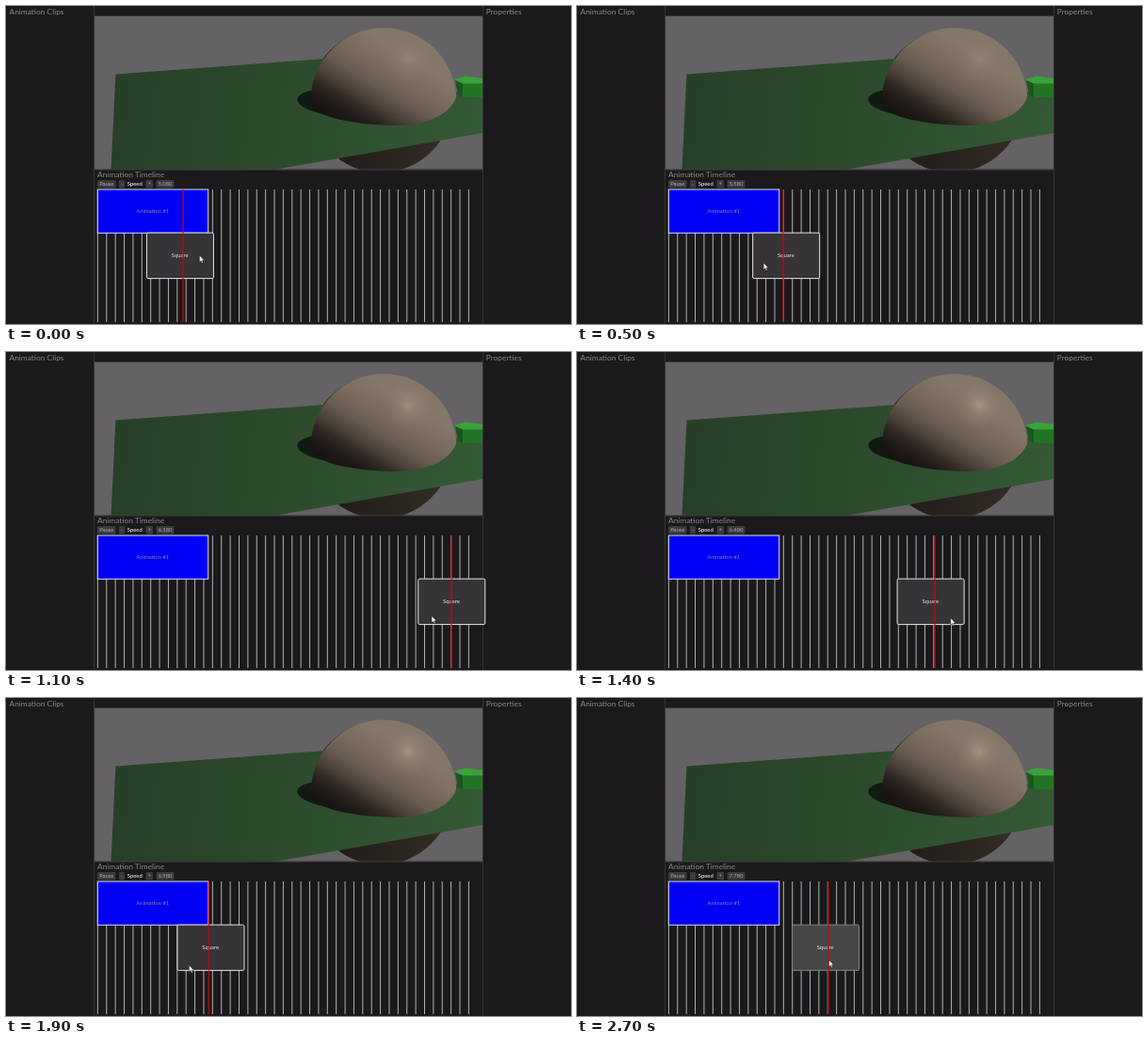
These frames come from a looping animation (600 by 338 pixels, 2.8 s). An HTML page:

```html
<!DOCTYPE html>
<html lang="en">
<head>
<meta charset="utf-8">
<title>Animation Timeline</title>
<style>
  html, body { margin: 0; width: 100%; height: 100%; overflow: hidden; background: #1b191b; }
  svg { display: block; width: 600px; height: 338px; }
  text { font: 5.9px Lato, sans-serif; fill: #acacac; }
  .title { font-size: 8.4px; fill: #888; }
  .mid { text-anchor: middle; }
  .button { fill: #3b3b3b; }
  .edge { stroke: #353435; fill: none; }
  #clip rect { fill: #363436; stroke: #e6e6e6; }
  #clip.released rect { fill: #464646; stroke: #858585; }
  #clip text { fill: #e6e6e6; }
</style>
</head>
<body>
<svg viewBox="0 0 600 338">
  <defs>
    <clipPath id="view"><rect x="94" y="11" width="412" height="162.7"/></clipPath>
    <clipPath id="above">
      <path d="M300 11H500V94H479C474 114 449 127 413 127C366 126 328 118 322 102H300Z"/>
    </clipPath>
    <linearGradient id="grass" gradientUnits="userSpaceOnUse" x1="120" y1="80" x2="500" y2="130">
      <stop offset="0" stop-color="#273f28"/>
      <stop offset=".45" stop-color="#2b4a2b"/>
      <stop offset="1" stop-color="#345a35"/>
    </linearGradient>
    <linearGradient id="skin" gradientUnits="userSpaceOnUse" x1="430" y1="55" x2="378" y2="140">
      <stop offset="0" stop-color="#85766a"/>
      <stop offset=".25" stop-color="#7a6b5e"/>
      <stop offset=".45" stop-color="#675a4f"/>
      <stop offset=".6" stop-color="#4d433a"/>
      <stop offset=".74" stop-color="#2f2823"/>
      <stop offset=".87" stop-color="#1d1916"/>
      <stop offset="1" stop-color="#161311"/>
    </linearGradient>
    <radialGradient id="shine">
      <stop offset="0" stop-color="#cdbba8" stop-opacity=".8"/>
      <stop offset=".4" stop-color="#b8a591" stop-opacity=".4"/>
      <stop offset="1" stop-color="#a08d7b" stop-opacity="0"/>
    </radialGradient>
    <linearGradient id="under">
      <stop offset="0" stop-color="#1d1916"/>
      <stop offset="1" stop-color="#342d27"/>
    </linearGradient>
  </defs>

  <rect width="600" height="338" fill="#1b191b"/>

  <g clip-path="url(#view)">
    <rect x="94" y="11" width="412" height="163" fill="#646264"/>
    <circle cx="398" cy="101" r="76" fill="url(#under)"/>
    <path d="M116.4 72.5L339 56L440 48L477 91L506 97V135L285 174H111.5Z" fill="url(#grass)"/>
    <path d="M328 89C313 91 307 97 310 102C314 109 327 113 345 117V89Z" fill="#0f1b11"/>
    <path d="M476 78L488 74.5L508 77V82.5L485 82.5Z" fill="#39a339"/>
    <path d="M477 79L485 82.5V97L480 95Z" fill="#1a571c"/>
    <path d="M485 82.5H508V97L485 96.5Z" fill="#237524"/>
    <g clip-path="url(#above)">
      <circle cx="401" cy="100.5" r="77.3" fill="url(#skin)"/>
      <circle cx="427" cy="57" r="26" fill="url(#shine)" id="glow"/>
    </g>
  </g>

  <path class="edge" d="M93.5 0V338M506.5 0V338M94 10.5H506M94 174.2H506"/>

  <text class="title" x="3.5" y="8.8">Animation Clips</text>
  <text class="title" x="509.7" y="8.8">Properties</text>
  <text class="title" x="97" y="181.8">Animation Timeline</text>

  <g class="button">
    <rect x="97" y="185" width="19.5" height="8.5" rx="1"/>
    <rect x="120" y="185" width="6" height="8.5" rx="1"/>
    <rect x="148.5" y="185" width="7.5" height="8.5" rx="1"/>
    <rect x="159.5" y="185" width="19" height="8.5" rx="1"/>
  </g>
  <g class="mid">
    <text x="106.8" y="191.3">Pause</text>
    <text x="123" y="191.3">-</text>
    <text x="136.8" y="191.3" style="fill:#fff">Speed</text>
    <text x="152.3" y="191.3">+</text>
    <text x="169" y="191.3" id="clock"></text>
  </g>

  <path id="grid" stroke="#b4b4b4"/>
  <rect x="97.3" y="195" width="117.4" height="46.3" fill="#0000f4" stroke="#dedeee"/>
  <text class="mid" x="155.8" y="220.2" style="fill:#8080b4">Animation #1</text>

  <g id="clip">
    <rect x=".5" y="241.1" width="71" height="48.5" rx="1.5"/>
    <text class="mid" x="35.7" y="267.2">Square</text>
  </g>
  <path id="head" d="M0 195V336" stroke="#d80010" stroke-width="1.5" stroke-opacity=".78"/>
  <path id="mouse" d="M0 0V7.2L1.7 5.7L2.8 8.2L4 7.7L2.9 5.2H5.1Z" fill="#fff" stroke="#161616" stroke-width=".5"/>
</svg>

<script>
const STEP = 100, LOOP = 2800, RELEASE = 25;
const REST = 264, NOTCH = 4.65, GRID = 9.381;
const $ = id => document.getElementById(id);
const clamp = (v, lo, hi) => Math.min(hi, Math.max(lo, v));

// turning points of the drag: step, playhead x
const turns = [[0, 188], [3, 246], [8.5, 154], [11, 473], [13, 352], [15, 408], [20, 195], [23, 264.2], [28, 267]];

function swing(step) {
  const i = turns.findIndex(turn => turn[0] > step);
  const [t0, x0] = turns[i - 1], [t1, x1] = turns[i];
  const ease = (1 - Math.cos(Math.PI * (step - t0) / (t1 - t0))) / 2;
  return { x: x0 + (x1 - x0) * ease, span: x1 - x0 };
}

// the clip trails the playhead, snapped to notches
function clipX({ x, span }) {
  const snap = span > 0 ? Math.floor : Math.ceil;
  return REST - 35.5 + NOTCH * snap((x - REST) / NOTCH);
}

const move = (id, x, y = 0) => $(id).setAttribute('transform', `translate(${x} ${y})`);

function draw(step) {
  const head = swing(step);
  const lead = clamp(head.span * 0.3, -21, 21);
  move('head', head.x);
  move('clip', clipX(head) - 0.5);
  move('mouse', head.x + lead, 265 + 19 * Math.sin(Math.PI * step / 36));
  $('clip').classList.toggle('released', step >= RELEASE);
  $('clock').textContent = (5.08 + step * STEP / 1000).toFixed(3);
  $('glow').setAttribute('opacity', 0.25 + 0.3 * clamp((step - 9) / 3, 0, 1));
}

$('grid').setAttribute('d',
  Array.from({ length: 43 }, (_, i) => `M${97.4 + i * GRID} 195V336`).join(''));

const start = performance.now();
function tick() {
  const time = (performance.now() - start) % LOOP;
  draw(Math.floor(time / STEP));
  requestAnimationFrame(tick);
}
tick();
</script>
</body>
</html>
```
